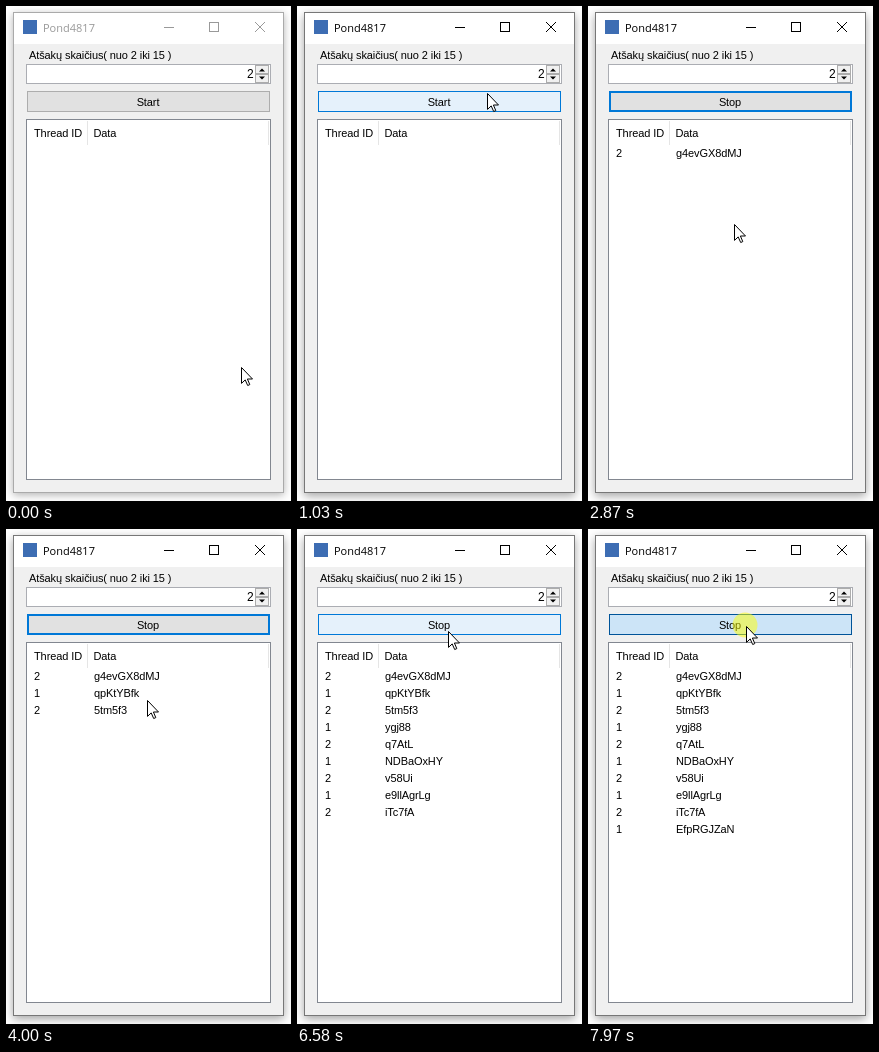
Animation of 285x495 px, one loop 8000 ms. Source, as an HTML page:

```html
<!DOCTYPE html>
<html lang="lt">
<head>
<meta charset="utf-8">
<title>Pond4817</title>
<style>
html, body { margin: 0; width: 100%; height: 100%; overflow: hidden; background: #fff; }
body { position: relative; font: 11px "Liberation Sans", Arial, sans-serif; letter-spacing: -.1px; color: #000; }
body > * { position: absolute; box-sizing: border-box; }
svg { left: 0; top: 0; overflow: visible; }

.window {
  left: 7px; top: 6px; width: 271px; height: 481px;
  border: 1px solid;
  background: linear-gradient(#fff 31px, #f0f0f0 31px);
  animation: activate 8s step-end infinite;
}
@keyframes activate {
  0% { border-color: #aaa; box-shadow: 0 2px 8px rgba(0, 0, 0, .3); }
  11.37%, 100% { border-color: #777; box-shadow: 0 3px 9px rgba(0, 0, 0, .36); }
}

.caption { color: #000; animation: caption 8s step-end infinite; }
.caption text { font: 11px "Open Sans", "Noto Sans", sans-serif; letter-spacing: 0; fill: currentColor; }
.caption path { fill: none; stroke: currentColor; }
@keyframes caption {
  0% { color: #999; }
  11.37%, 100% { color: #000; }
}

.button {
  left: 21px; top: 85px; width: 243px; height: 21px;
  border: 1px solid;
  animation: button 8s step-end infinite;
}
@keyframes button {
  0% { background: #e1e1e1; border-color: #adadad; box-shadow: none; }
  3.97%, 12.87% { background: #e5f1fb; border-color: #0078d7; box-shadow: none; }
  11.37% { background: #cce4f7; border-color: #005499; box-shadow: none; }
  31.4% { background: #e1e1e1; border-color: #0078d7; box-shadow: inset 0 0 0 1px #0078d7; }
  82.03% { background: #e5f1fb; border-color: #0078d7; box-shadow: none; }
  99.61%, 100% { background: #cce4f7; border-color: #005499; box-shadow: none; }
}

.start { animation: start 8s step-end infinite; }
.stop { animation: stop 8s step-end infinite; }
@keyframes start { 0% { opacity: 1; } 13.24%, 100% { opacity: 0; } }
@keyframes stop { 0% { opacity: 0; } 13.24%, 100% { opacity: 1; } }

/* Growing by one 17px line reveals one more row */
.rows {
  left: 28px; top: 139px; width: 220px;
  margin: 0; padding: 0; list-style: none; line-height: 17px;
  overflow: hidden;
  animation: rows 8s step-end infinite;
}
.rows li { height: 17px; white-space: nowrap; }
.rows b { display: inline-block; width: 60px; font-weight: 400; }
@keyframes rows {
  0% { height: 0; }
  33.75% { height: 17px; }
  37.5% { height: 34px; }
  47.24% { height: 51px; }
  51% { height: 68px; }
  55.36% { height: 85px; }
  62.74% { height: 102px; }
  63.99% { height: 119px; }
  74.98% { height: 136px; }
  80% { height: 153px; }
  95.99%, 100% { height: 170px; }
}

/* Every moving stretch is sampled in four hops */
.cursor { animation: move 8s steps(4, jump-start) infinite; }
@keyframes move {
  0%, .37% { transform: translate(235px, 361px); }
  2.44% { transform: translate(208px, 180px); }
  4.5%, 6.24% { transform: translate(188px, 85px); }
  6.25%, 29.86% { transform: translate(190px, 87px); }
  31.94% { transform: translate(170px, 111px); }
  34% { transform: translate(152px, 165px); }
  36.06% { transform: translate(146px, 218px); }
  38.12%, 40.24% { transform: translate(150px, 202px); }
  41.75% { transform: translate(142px, 197px); }
  43.25%, 47.24% { transform: translate(130px, 188px); }
  49.17% { transform: translate(134px, 178px); }
  50.05% { transform: translate(141px, 171px); }
  52.12%, 67.86% { transform: translate(158px, 167px); }
  67.87%, 79.12% { transform: translate(156px, 167px); }
  81.19% { transform: translate(154px, 125px); }
  82.31% { transform: translate(151px, 102px); }
  84.37% { transform: translate(154px, 83px); }
  87%, 100% { transform: translate(158px, 97px); }
}
.click { fill: rgba(255, 255, 0, .5); animation: click 8s step-end infinite; }
@keyframes click {
  0%, 12.87% { opacity: 0; }
  11.37%, 99.61%, 100% { opacity: 1; }
}
</style>
</head>
<body>
<div class="window"></div>
<div class="button"></div>

<svg width="285" height="495" shape-rendering="crispEdges">
  <rect x="17" y="14" width="14" height="14" fill="#3d6db3"/>
  <g class="caption">
    <text x="37" y="26">Pond4817</text>
    <path d="M158 21.5h10M203.5 16.5h9v9h-9z"/>
    <path d="M249 16l10 10M259 16l-10 10" shape-rendering="auto"/>
  </g>

  <text x="23" y="53">Atšakų skaičius( nuo 2 iki 15 )</text>
  <rect x="20.5" y="58.5" width="244" height="19" fill="#fff" stroke="#abadb3"/>
  <text x="247.5" y="72" font-size="12" text-anchor="end">2</text>
  <path d="M249.5 59.5h13v8h-13zM249.5 68.5h13v8h-13z" fill="#f0f0f0" stroke="#acacac"/>
  <path d="M253 65.5h6l-3-3zM253 70.5h6l-3 3z" shape-rendering="auto"/>

  <g text-anchor="middle">
    <text class="start" x="142" y="100">Start</text>
    <text class="stop" x="142" y="100">Stop</text>
  </g>

  <rect x="20.5" y="113.5" width="244" height="360" fill="#fff" stroke="#828790"/>
  <path d="M81.5 115v24M262.5 115v24" stroke="#e5e5e5"/>
  <text x="28" y="131">Thread ID</text>
  <text x="87.5" y="131">Data</text>
</svg>

<ol class="rows">
  <li><b>2</b>g4evGX8dMJ</li>
  <li><b>1</b>qpKtYBfk</li>
  <li><b>2</b>5tm5f3</li>
  <li><b>1</b>ygj88</li>
  <li><b>2</b>q7AtL</li>
  <li><b>1</b>NDBaOxHY</li>
  <li><b>2</b>v58Ui</li>
  <li><b>1</b>e9llAgrLg</li>
  <li><b>2</b>iTc7fA</li>
  <li><b>1</b>EfpRGJZaN</li>
</ol>

<svg width="285" height="495">
  <g class="cursor">
    <circle class="click" cx="-1" cy="-1" r="12.5"/>
    <path d="M.5.5V16.4L4.2 12.9 6.7 18.5 8.8 17.6 6.4 12H11.5Z" fill="#fff" stroke="#000"/>
  </g>
</svg>
</body>
</html>
```
